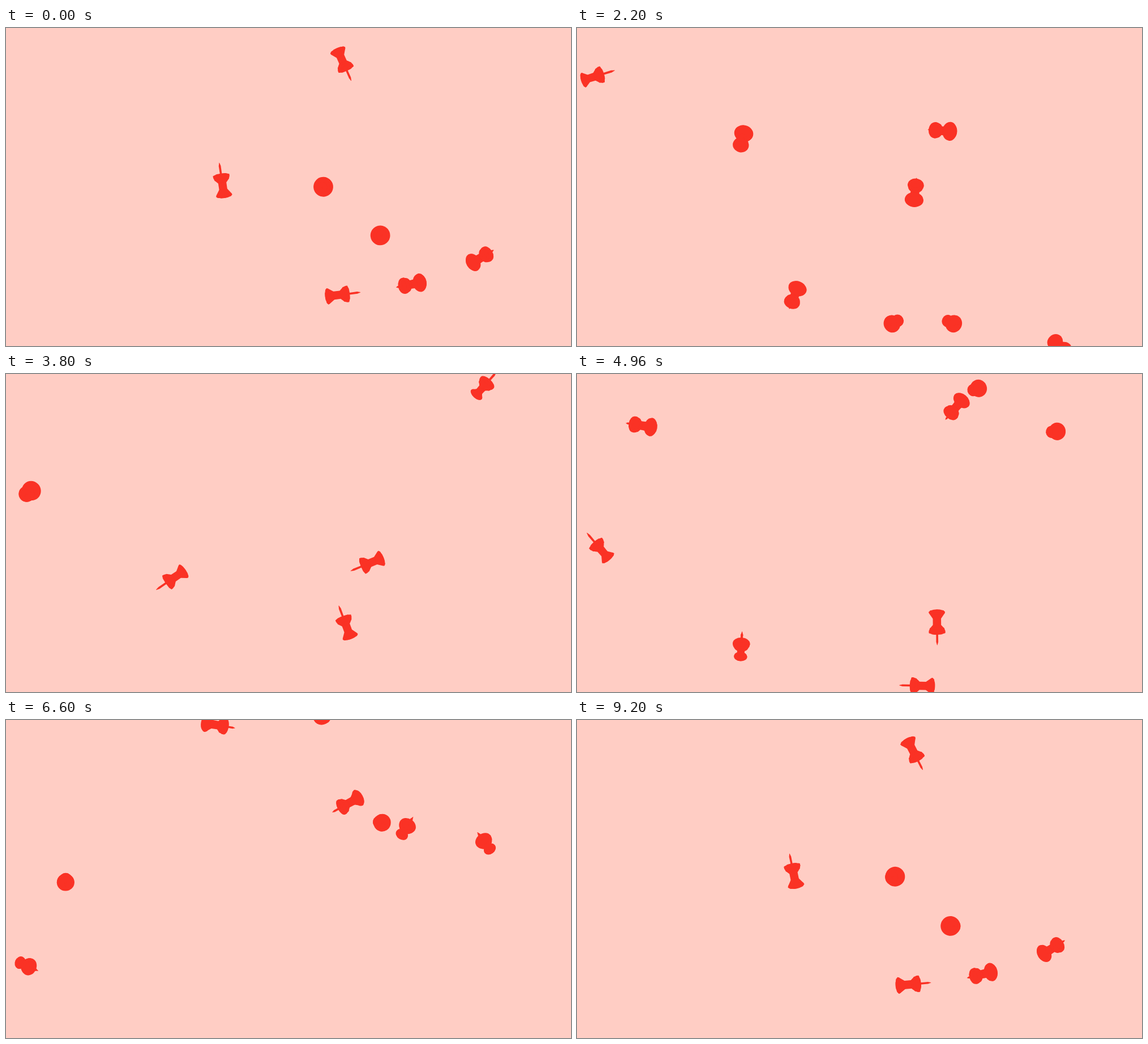
Write an HTML page with a canvas that moves like this. It is 998 by 561 pixels and loops after 9.23 s.

```html
<!DOCTYPE html>
<html lang="en">
<head>
<meta charset="utf-8">
<title>Falling pins</title>
<style>
html, body { margin: 0; width: 100%; height: 100%; overflow: hidden; background: #ffcdc4; }
canvas { display: block; }
</style>
</head>
<body>
<canvas id="stage" width="998" height="561"></canvas>
<script>
const ctx = document.getElementById('stage').getContext('2d');
const FPS = 30, LOOP = 277 / FPS;
const RAD = Math.PI / 180;
const CENTER = 33;       // pivot, measured from the cap end
const DEPTH = 0.0085;    // size gain per pixel towards the viewer

// Key points of the turned solid: distance from the cap end, radius
const PROFILE = [
  [0, 0], [0.6, 7], [2, 12], [4, 14], [6, 13.4], [15, 7.1], [26, 7.2],
  [28.5, 9.5], [32, 12.8], [37, 14.6], [40, 14.7], [42, 10], [42.5, 1.8], [57, 1.9], [63, 0.3]
];

// Every pin falls, tumbles end over end and spins on screen, each at a steady rate.
// Pins in a group share their tumble; angles are in degrees, rates per second.
const GROUPS = [
  { tumble: 36, phase: -47, pins: [
    { x: 846, y: 401, fall: 70.2, angle: 149, spin: 36.3 },
    { x: 707, y: 454, fall: 100.3, angle: 349, spin: 86 },
    { x: 290, y: -16, fall: 100, angle: 182, spin: -199 }
  ] },
  { tumble: 72, phase: -3, pins: [
    { x: 558.7, y: 280.8, fall: 109, angle: -18, spin: -86.5 },
    { x: 663, y: 366, fall: 70.3, angle: -177, spin: -72 },
    { x: 105.3, y: 599.5, fall: 119.5, angle: -67, spin: -60 }
  ] },
  { tumble: 72, phase: 101, pins: [
    { x: 37.3, y: -91, fall: 79.5, angle: 322, spin: -236 }
  ] },
  { tumble: 144.5, phase: 84, pins: [
    { x: 597.3, y: 469.8, fall: 121, angle: -7, spin: -60 },
    { x: 381, y: 266.5, fall: 97.3, angle: -98.5, spin: 95.7 },
    { x: 598, y: 66.5, fall: 97.3, angle: 66, spin: 95.7 },
    { x: 636, y: -33.5, fall: 97.3, angle: -26, spin: 95.7 }
  ] }
];

function drawPin(x, y, turn, tilt) {
  const cos = Math.cos(turn), sin = Math.sin(turn);
  const reach = Math.sin(tilt), depth = -Math.cos(tilt);
  const rings = PROFILE.map(([pos, radius]) => {
    const along = pos - CENTER, scale = 1 + DEPTH * along * depth;
    const shift = along * reach * scale;
    return { x: x + cos * shift, y: y + sin * shift, r: radius * scale };
  });
  ctx.beginPath();
  for (const p of rings) ctx.lineTo(p.x - sin * p.r, p.y + cos * p.r);
  for (const p of [...rings].reverse()) ctx.lineTo(p.x + sin * p.r, p.y - cos * p.r);
  ctx.fill();
  for (const p of rings) {
    ctx.beginPath();
    ctx.ellipse(p.x, p.y, p.r * Math.abs(depth), p.r, turn, 0, 2 * Math.PI);
    ctx.fill();
  }
}

function draw(now) {
  const time = Math.floor((now % 9230 + 6.7) * FPS / 1000) / FPS;
  ctx.fillStyle = '#ffcdc4';
  ctx.fillRect(0, 0, 998, 561);
  ctx.fillStyle = '#fa3225';
  for (const { tumble, phase, pins } of GROUPS) {
    for (const { x, y, fall, angle, spin } of pins) {
      const enter = -(y + 40) / fall;
      const t = enter + ((time - enter) % LOOP + LOOP) % LOOP;
      drawPin(x, y + fall * t, (angle + spin * t) * RAD, (phase + tumble * t) * RAD);
    }
  }
}

const start = performance.now();
function tick() {
  draw(performance.now() - start);
  requestAnimationFrame(tick);
}
tick();
</script>
</body>
</html>
```
